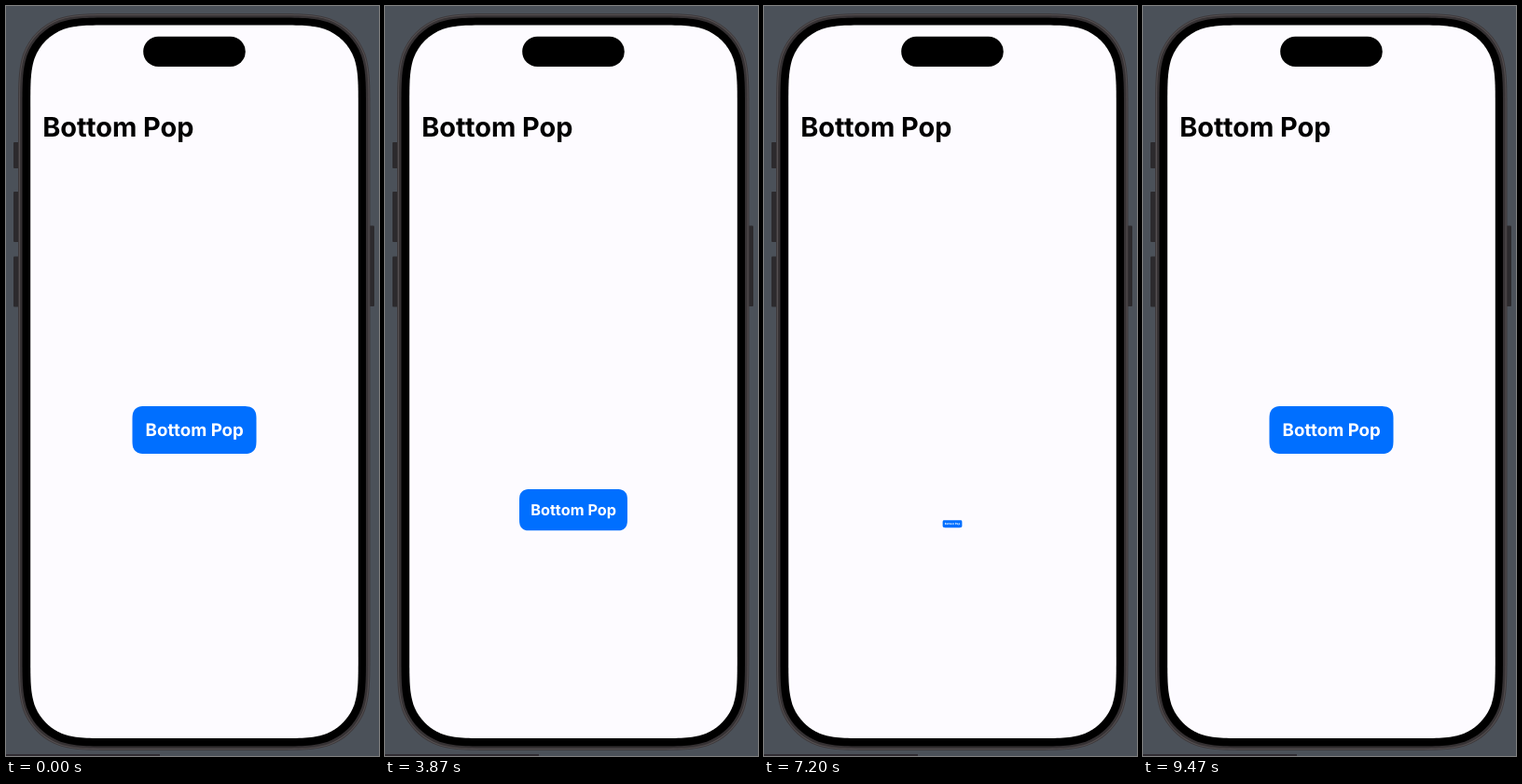
These frames come from a looping animation (400 px wide and 804 px high, 9.54 s). An HTML page:

```html
<!DOCTYPE html>
<html lang="en">
<head>
<meta charset="utf-8">
<title>Bottom Pop</title>
<style>
  html, body { margin: 0; width: 100%; height: 100%; overflow: hidden; background: #4b5159; }
  svg { display: block; width: 400px; height: 804px; }
  text {
    font-family: Inter, "Liberation Sans", sans-serif;
    font-weight: 700;
    font-optical-sizing: none;
    text-rendering: geometricPrecision;
  }
  .title { font-size: 28.9px; letter-spacing: -0.002em; fill: #000; }
  .label { font-size: 18.7px; fill: #fff; text-anchor: middle; }
</style>
</head>
<body>
<svg viewBox="0 0 400 804">
  <rect width="400" height="804" fill="#4b5159"/>
  <rect y="802" width="165" height="2" fill="#312d33"/>
  <g fill="#2c2a2d">
    <rect x="8" y="146" width="6" height="28" rx="1"/>
    <rect x="8" y="199" width="6" height="54" rx="1"/>
    <rect x="8" y="268.5" width="6" height="54" rx="1"/>
    <rect x="389" y="235.5" width="6" height="86.5" rx="1"/>
  </g>
  <g id="phone"></g>
  <rect x="147.2" y="32.8" width="109.6" height="32.3" rx="16.15"/>
  <text class="title" x="39.2" y="140">Bottom Pop</text>
  <g id="button">
    <path id="plate" fill="#006fff"/>
    <text class="label" x="0.2" y="6.9">Bottom Pop</text>
  </g>
</svg>
<script>
const LOOP = 9540;
const STEP = 200 / 3;
const HOME = { x: 202, y: 454.5 };
const DROP = 764;          // four times the depth of the arc
const POP_MS = 1400;
const pops = [2816, 6816];
const cuts = [2199, 6199];

// Rounded rectangle with continuous-curvature corners.
function squircle(x, y, w, h, r) {
  const a = 1.528665 * r, b = 1.088493 * r, c = 0.868407 * r, d = 0.631494 * r;
  const e = 0.372824 * r, f = 0.16906 * r, g = 0.074911 * r;
  const corner = [[a, 0], [b, 0], [c, 0], [d, g], [e, f], [f, e], [g, d], [0, c], [0, b], [0, a]];
  const place = [
    ([u, v]) => [x + u, y + v],
    ([u, v]) => [x + u, y + h - v],
    ([u, v]) => [x + w - u, y + h - v],
    ([u, v]) => [x + w - u, y + v]
  ];
  const parts = place.map((put, i) => {
    const pts = (i % 2 ? corner.slice().reverse() : corner).map(put);
    return (i ? "L" : "M") + pts[0] + "C" + pts.slice(1).join(" ");
  });
  return parts.join("") + "Z";
}

function addLayer(fill, ...box) {
  const path = document.createElementNS("http://www.w3.org/2000/svg", "path");
  path.setAttribute("d", squircle(...box));
  path.setAttribute("fill", fill);
  document.getElementById("phone").append(path);
}

addLayer("#3d393b", 13, 8, 377.5, 790, 69);
addLayer("#544f51", 14, 9, 375.5, 788, 68);
addLayer("#353133", 15, 10, 373.5, 786, 67);
addLayer("#000", 17.5, 12.5, 368.5, 781, 65);
addLayer("#fdfbff", 26.2, 20.5, 351.6, 764.5, 57);
document.getElementById("plate").setAttribute("d", squircle(-66.5, -25.5, 133, 51, 10.8));

// Ease in and out: cubic Bezier (0.42, 0, 0.58, 1).
function ease(x) {
  if (x <= 0) return 0;
  if (x >= 1) return 1;
  let lo = 0, hi = 1;
  for (let i = 0; i < 30; i++) {
    const s = (lo + hi) / 2, q = 1 - s;
    if (1.26 * s * q * q + 1.74 * s * s * q + s * s * s < x) lo = s;
    else hi = s;
  }
  return lo * lo * (3 - 2 * lo);
}

function progress(t) {
  if (t < cuts[0]) return 1;
  const start = t < cuts[1] ? pops[0] : pops[1];
  return ease((t - start) / POP_MS);
}

const button = document.getElementById("button");

function draw(now) {
  const t = Math.floor((now % LOOP + 3.4) / STEP) * STEP;
  const p = progress(t);
  const y = HOME.y + DROP * p * (1 - p);
  button.setAttribute("visibility", p > 0.005 ? "visible" : "hidden");
  button.setAttribute("transform", `translate(${HOME.x} ${y}) scale(${p})`);
}

const origin = performance.now();
function tick() {
  draw(performance.now() - origin);
  requestAnimationFrame(tick);
}
tick();
</script>
</body>
</html>
```
